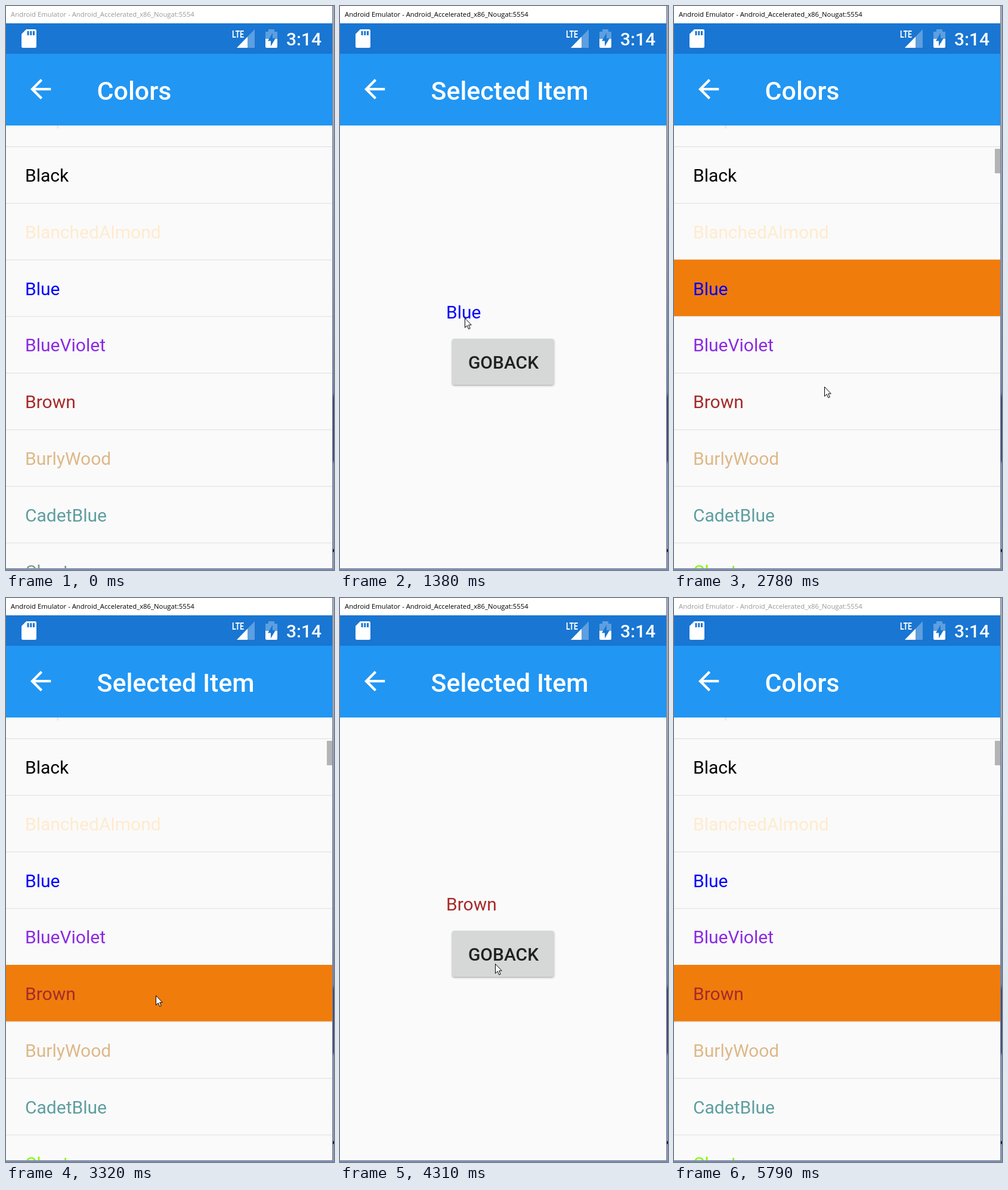
An HTML page that plays this animation: 550 px wide and 944 px high, repeating every 5940 ms.

```html
<!DOCTYPE html>
<html lang="en">
<head>
<meta charset="utf-8">
<title>Colors</title>
<style>
  html, body { margin: 0; width: 100%; height: 100%; overflow: hidden; background: #fff; }
  svg { display: block; width: 550px; height: 944px; }
  text { font: 400 30px Roboto, sans-serif; white-space: pre; }
  .medium { font-weight: 500; }
  #caption { font: 400 11.3px "Open Sans", "Noto Sans", sans-serif; }
  #title { font-size: 42.86px; }
  #lte { font: 700 16px Roboto, sans-serif; }
</style>
</head>
<body>
<svg viewBox="0 0 550 944">
  <defs>
    <clipPath id="page"><rect y="200" width="547" height="741"/></clipPath>
    <linearGradient id="edge" x2="0" y2="1">
      <stop offset="0" stop-color="#a9adb6"/>
      <stop offset=".2" stop-color="#a4a8b4"/>
      <stop offset=".45" stop-color="#8d97ab"/>
      <stop offset=".685" stop-color="#76819d"/>
      <stop offset=".695" stop-color="#414766"/>
      <stop offset=".805" stop-color="#4a5070"/>
      <stop offset=".812" stop-color="#8791ab"/>
      <stop offset="1" stop-color="#8f99b2"/>
    </linearGradient>
    <filter id="shadow" x="-10%" y="-10%" width="120%" height="130%">
      <feDropShadow dx="0" dy="1.5" stdDeviation="1.6" flood-opacity=".32"/>
    </filter>
  </defs>

  <rect width="550" height="944" fill="url(#edge)"/>
  <rect y="941" width="550" height="3" fill="#8290b0"/>
  <rect x="547" width="1" height="944" fill="#7385a6"/>
  <rect x="548" y="909" width="2" height="5" fill="#20242e"/>
  <rect width="547" height="29" fill="#fff"/>
  <text id="caption" x="8" y="18">Android Emulator - Android_Accelerated_x86_Nougat:5554</text>

  <rect y="29" width="547" height="51" fill="#1976d2"/>
  <g fill="#fff">
    <path d="M34 39H48.500Q51 39 51 41.500V67.500Q51 70 48.500 70H28.500Q26 70 26 67.500V47Z"/>
    <path d="M35.500 42h3v7h-3zM40.300 42h3v7h-3zM45 42h3v7h-3z" fill="#1976d2"/>
    <text id="lte" x="379" y="52.500" textLength="20" lengthAdjust="spacingAndGlyphs">LTE</text>
    <path d="M387 70L417 39V70Z" opacity=".3"/>
    <path d="M387 70L405 51.500V70Z"/>
    <path d="M440 39h10v4h5v12h-20v-12h5z" opacity=".3"/>
    <path d="M435 55h20v13q0 2-2 2h-16q-2 0-2-2z"/>
    <path d="M447 45L439 58.500H444V67.500L452 54H447Z" fill="#1976d2"/>
    <text class="medium" x="470" y="66">3:14</text>
  </g>

  <rect y="80" width="547" height="120" fill="#2196f3"/>
  <path transform="translate(32.400 113.500) scale(2.143)" fill="#fff"
    d="M20 11H7.830l5.590-5.590L12 4l-8 8 8 8 1.410-1.410L7.830 13H20z"/>
  <text id="title" class="medium" x="152.500" y="157" fill="#fff"></text>

  <rect y="200" width="547" height="741" fill="#fafafa"/>
  <g clip-path="url(#page)">
    <g id="list"></g>
    <g id="detail">
      <text id="choice" x="178" y="523"></text>
      <rect x="188" y="557" width="171" height="77" rx="4" fill="#d6d7d7" filter="url(#shadow)"/>
      <text class="medium" x="274" y="607" text-anchor="middle" fill="#212121">GOBACK</text>
    </g>
  </g>
  <path id="cursor" fill="#fff" stroke="#000" d="M.5 .5V16.300L4.200 12.800L6.700 18.700L9.200 17.600L6.700 11.900H11.300Z"/>
</svg>
<script>
const LOOP = 5940, PITCH = 94.75;
const $ = id => document.getElementById(id);
const names = ['Bisque', 'Black', 'BlanchedAlmond', 'Blue', 'BlueViolet',
  'Brown', 'BurlyWood', 'CadetBlue', 'Chartreuse'];

function add(tag, attrs, text = '') {
  const el = document.createElementNS('http://www.w3.org/2000/svg', tag);
  for (const key in attrs) el.setAttribute(key, attrs[key]);
  el.textContent = text;
  return $('list').appendChild(el);
}

const rows = {}, labels = {};
names.forEach((name, i) => {
  const top = 235 + PITCH * (i - 1);
  rows[name] = add('rect', { y: top, width: 547, height: PITCH, fill: '#f07c0c' });
  add('rect', { y: top + PITCH, width: 547, height: 1, fill: '#dedede' });
  labels[name] = add('text', { x: 32, y: 294 + PITCH * (i - 1), fill: name.toLowerCase() }, name);
});
const bar = add('rect', { x: 538, y: 239, width: 9, height: 41, fill: '#b4b4b4' });

// Each step changes only the values it names; they hold until the next one.
const steps = [
  [0, { active: false, title: 'Colors', pick: '', choice: 'Blue', bar: 0, list: 1, scale: 1, detail: 0 }],
  [690, { active: true }],
  [920, { pick: 'Blue' }],
  [1000, { title: 'Selected Item' }],
  [1080, { list: .45, scale: .99, detail: .5 }],
  [1150, { list: .07, scale: .975, detail: .92 }],
  [1230, { list: 0, detail: 1 }],
  [2220, { list: .5, scale: .994, detail: 0, bar: 1 }],
  [2300, { list: .87, scale: 1 }],
  [2370, { list: 1 }],
  [2450, { title: 'Colors' }],
  [3240, { title: 'Selected Item', pick: 'Brown', choice: 'Brown' }],
  [3400, { list: .45, scale: .99, detail: .5 }],
  [3470, { list: .07, scale: .975, detail: .92 }],
  [3560, { list: 0, detail: 1 }],
  [4630, { list: .3, scale: .99, detail: 0 }],
  [4700, { list: .66, scale: .996 }],
  [4780, { list: .92, scale: .999 }],
  [4860, { list: 1, scale: 1 }],
  [4940, { title: 'Colors' }],
  [5790, { active: false }]
];

// Pointer moves: first change, last change, number of changes, end point.
const moves = [
  [130, 520, 6, 201, 458],
  [690, 840, 2, 209, 500],
  [1310, 1380, 2, 209, 522],
  [1460, 1850, 6, 254, 595],
  [2620, 2950, 5, 251, 665],
  [3860, 4390, 8, 261, 604],
  [4460, 4460, 1, 261, 603],
  [4940, 5210, 4, 440, 944]
];

function pointer(t) {
  let x = 483, y = 928;
  for (const [from, to, count, endX, endY] of moves) {
    if (t < from) break;
    const gap = (to - from) / (count - 1) || 1;
    const part = Math.min(1, (Math.floor((t - from) / gap + .08) + 1) / count);
    x += (endX - x) * part;
    y += (endY - y) * part;
  }
  return [Math.round(x), Math.round(y)];
}

function draw(t) {
  const s = {};
  for (const [time, change] of steps) if (t >= time) Object.assign(s, change);
  $('caption').setAttribute('fill', s.active ? '#000' : '#999');
  $('title').textContent = s.title;
  $('choice').textContent = s.choice;
  $('choice').setAttribute('fill', s.choice.toLowerCase());
  $('detail').setAttribute('opacity', s.detail);
  $('list').setAttribute('opacity', s.list);
  $('list').setAttribute('transform',
    `translate(273.5 570.5) scale(${s.scale}) translate(-273.5 -570.5)`);
  for (const name of names) rows[name].setAttribute('opacity', name === s.pick ? 1 : 0);
  labels.Chartreuse.setAttribute('fill', t < 690 ? '#7f9f85' : 'chartreuse');
  bar.setAttribute('opacity', s.bar);
  $('cursor').setAttribute('transform', `translate(${pointer(t)})`);
  $('cursor').setAttribute('opacity', t >= 130 && t < 5210 ? 1 : 0);
}

const start = performance.now();
function tick() {
  draw((performance.now() - start) % LOOP);
  requestAnimationFrame(tick);
}
tick();
</script>
</body>
</html>
```
